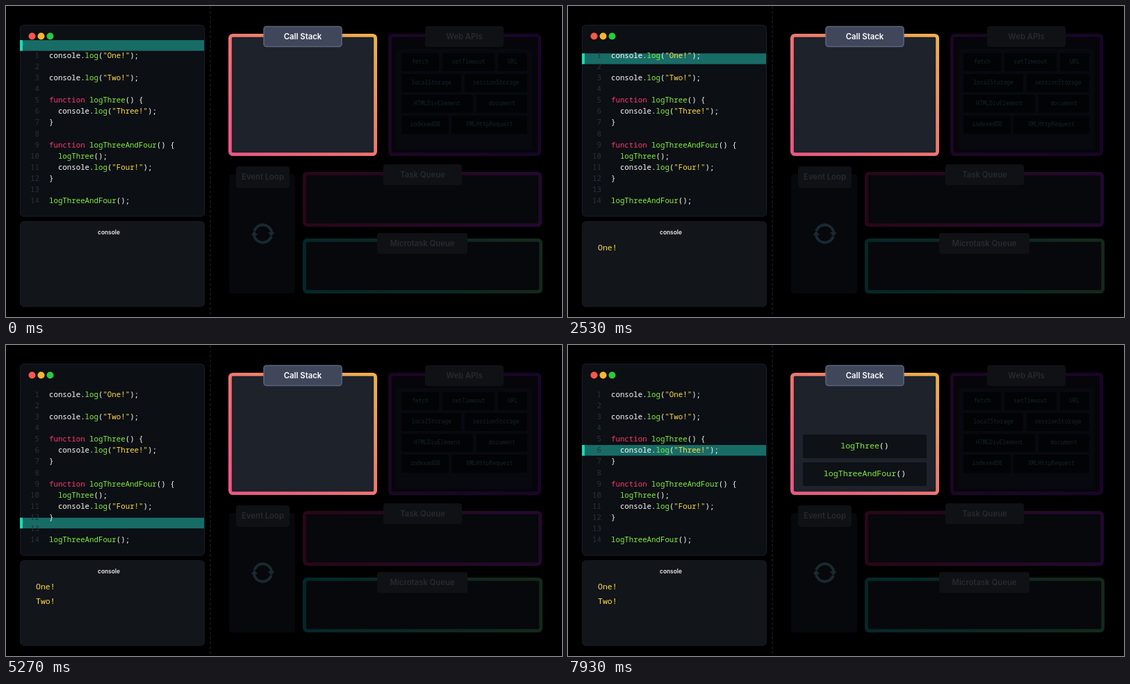
Write an HTML page that moves like this. It is 800 px wide and 448 px high and loops after 8000 ms.

```html
<!DOCTYPE html>
<html lang="en">
<head>
<meta charset="utf-8">
<title>Call stack</title>
<style>
html, body { margin: 0; width: 100%; height: 100%; overflow: hidden; background: #000; }
svg { display: block; width: 800px; height: 448px; }
text { white-space: pre; }
.mono { font-family: "Noto Sans Mono", "DejaVu Sans Mono", monospace; font-weight: 500; }
.sans { font-family: Inter, Roboto, sans-serif; font-weight: 600; }
</style>
</head>
<body>
<svg id="stage" viewBox="0 0 800 448" xmlns="http://www.w3.org/2000/svg">
  <defs>
    <linearGradient id="warm" x1="0" y1="1" x2="1" y2="0">
      <stop offset="0" stop-color="#ea5782"/><stop offset=".45" stop-color="#ef7072"/><stop offset="1" stop-color="#efb24a"/>
    </linearGradient>
    <linearGradient id="violet"><stop offset="0" stop-color="#1d0626"/><stop offset="1" stop-color="#19052a"/></linearGradient>
    <linearGradient id="rose"><stop offset="0" stop-color="#2a0718"/><stop offset="1" stop-color="#240830"/></linearGradient>
    <linearGradient id="teal"><stop offset="0" stop-color="#04282a"/><stop offset="1" stop-color="#14291c"/></linearGradient>
  </defs>
</svg>
<script>
const svg = document.getElementById('stage');
const LOOP = 8000;
const INK = '#262a31', TAB = '#0f1115', PANEL = '#07080b', NUMBER = '#2b323e';
const WHITE = '#fdfdfb', LIME = '#84ee40', YELLOW = '#ffdc48', PINK = '#fb3670';

function add(parent, tag, attrs, content) {
  const el = document.createElementNS('http://www.w3.org/2000/svg', tag);
  for (const k in attrs) el.setAttribute(k, attrs[k]);
  if (content !== undefined) el.textContent = content;
  parent.appendChild(el);
  return el;
}

// Rectangle given by its outer edges
function box(x1, y1, x2, y2, rx, fill, more = {}, parent = svg) {
  return add(parent, 'rect', { x: x1, y: y1, width: x2 - x1, height: y2 - y1, rx, fill, ...more });
}

function framed(x1, y1, x2, y2, stroke, fill) {
  const w = 4.8, h = w / 2;
  box(x1 + h, y1 + h, x2 - h, y2 - h, 4, fill, { stroke, 'stroke-width': w });
}

function label(str, x, y, size, fill, cls = 'sans', anchor = 'middle', parent = svg) {
  return add(parent, 'text', { x, y, class: cls, 'font-size': size, fill, 'text-anchor': anchor }, str);
}

function tab(str, x1, y1, x2, y2, base, size = 11.3) {
  box(x1, y1, x2, y2, 4, TAB);
  label(str, (x1 + x2) / 2, base, size, INK);
}

function code(str, x, y, size, anchor = 'start', parent = svg) {
  const line = label('', x, y, size, WHITE, 'mono', anchor, parent);
  for (const part of str.match(/"[^"]*"|\w+|\W/g) || []) {
    const fill = part[0] === '"' ? YELLOW
      : part === 'function' ? PINK
      : /^log/.test(part) ? LIME : WHITE;
    add(line, 'tspan', { fill }, part);
  }
}

// Editor
add(svg, 'path', { d: 'M294 0V448', stroke: '#1d2027', 'stroke-width': 1.2, 'stroke-dasharray': '4 3' });
box(20.5, 27.5, 285.5, 303, 5, '#0c0f14', { stroke: '#1b1d2c' });
['#fc574a', '#f8b532', '#2cc93c'].forEach((fill, i) =>
  add(svg, 'circle', { cx: 37.5 + 13 * i, cy: 43.5, r: 5, fill }));

const lineY = n => 71.6 + 16.03 * (n - 1);
const cursor = add(svg, 'g', {});
box(20, -7.7, 285, 7.7, 0, '#186c66', {}, cursor);
box(20, -7.7, 24, 7.7, 0, '#18deb4', {}, cursor);

const program = `console.log("One!");

console.log("Two!");

function logThree() {
  console.log("Three!");
}

function logThreeAndFour() {
  logThree();
  console.log("Four!");
}

logThreeAndFour();`;
program.split('\n').forEach((str, i) => {
  const y = lineY(i + 1) + 3.7;
  label(i + 1, 48, y, 10.75, NUMBER, 'mono', 'end');
  code(str, 62, y, 10.75);
});

// Console
box(20.5, 310.5, 285.5, 433, 5, '#121519', { stroke: '#16191f' });
label('console', 148, 329, 8.4, '#eeeeee');
const logs = ['One!', 'Two!'].map((str, i) => label(str, 43, 352 + 20.5 * i, 11.5, YELLOW, 'mono', 'start'));

// Call stack
framed(320, 40, 534, 216, 'url(#warm)', '#1d222b');
function stackItem(str, slot) {
  const g = add(svg, 'g', { opacity: 0 });
  const y = 169 - 40 * slot;
  box(338, y, 516, y + 34, 2, '#0e1115', {}, g);
  code(str, 427, y + 20, 11.6, 'middle', g);
  return g;
}
box(371, 29.5, 483, 58.5, 4, '#40475b', { stroke: '#59647a', 'stroke-width': 1.6 });
label('Call Stack', 427, 47.8, 11.3, '#ffffff');

// Web APIs
framed(550, 40, 770, 216, 'url(#violet)', '#05050a');
tab('Web APIs', 603, 29, 716, 59, 47.8);
box(562, 62, 757, 207, 3, '#08080f');
[
  [['fetch', 569, 623], ['setTimeout', 628, 703], ['URL', 708, 750]],
  [['localStorage', 569, 655], ['sessionStorage', 660, 750]],
  [['HTMLDivElement', 569, 672], ['document', 677, 750]],
  [['indexedDB', 569, 637], ['XMLHttpRequest', 641, 750]]
].forEach((row, i) => row.forEach(([name, x1, x2]) => {
  const y = 68 + 30 * i;
  box(x1, y, x2, y + 26, 2, '#020305');
  label(name, (x1 + x2) / 2, y + 15, 8, '#14262a', 'mono');
}));

// Event loop
box(321, 242, 416, 414, 4, PANEL);
tab('Event Loop', 331, 231, 408, 262, 249.8);
for (const turn of [0, 180]) {
  const half = add(svg, 'g', { transform: `translate(369.5 328) rotate(${turn})` });
  add(half, 'path', { d: 'M-12.3 -4A13 13 0 0 1 12.8 -2', fill: 'none', stroke: '#1a2932', 'stroke-width': 4 });
  add(half, 'path', { d: 'M7 -2H17L12.5 4Z', fill: '#1a2932' });
}

// Queues
framed(427, 239, 771, 318, 'url(#rose)', PANEL);
tab('Task Queue', 543, 228, 656, 258, 246.5);
framed(427, 335, 772, 414, 'url(#teal)', PANEL);
tab('Microtask Queue', 534, 327, 664, 357, 345.5);

// Every step of the program starts on an even beat
const beat = n => 625 * n - 100;
const moves = [[0, 1], [4, 3], [8, 14], [10, 10], [12, 6]];
const calls = [
  ['console.log("One!")', 0, 1, 3],
  ['console.log("Two!")', 0, 5, 7],
  ['logThreeAndFour()', 0, 9, Infinity],
  ['logThree()', 1, 11, Infinity]
].map(([str, slot, start, end]) => ({ g: stackItem(str, slot), start, end }));
const logBeats = [2, 6];

// Eased progress of a step that starts on beat n
function step(t, n, span = 500) {
  const u = Math.min(1, Math.max(0, (t - beat(n)) / span));
  return u < .5 ? 2 * u * u : 1 - 2 * (1 - u) * (1 - u);
}

function draw(t) {
  let line = 0;
  for (const [n, to] of moves) line += (to - line) * step(t, n);
  cursor.setAttribute('transform', `translate(0 ${lineY(line)})`);
  for (const { g, start, end } of calls) {
    g.setAttribute('opacity', step(t, start) * (1 - step(t, end)));
  }
  logs.forEach((el, i) => el.setAttribute('opacity', step(t, logBeats[i])));
}

const born = performance.now();
function tick() {
  draw((performance.now() - born) % LOOP);
  requestAnimationFrame(tick);
}
draw(0);
requestAnimationFrame(tick);
</script>
</body>
</html>
```
